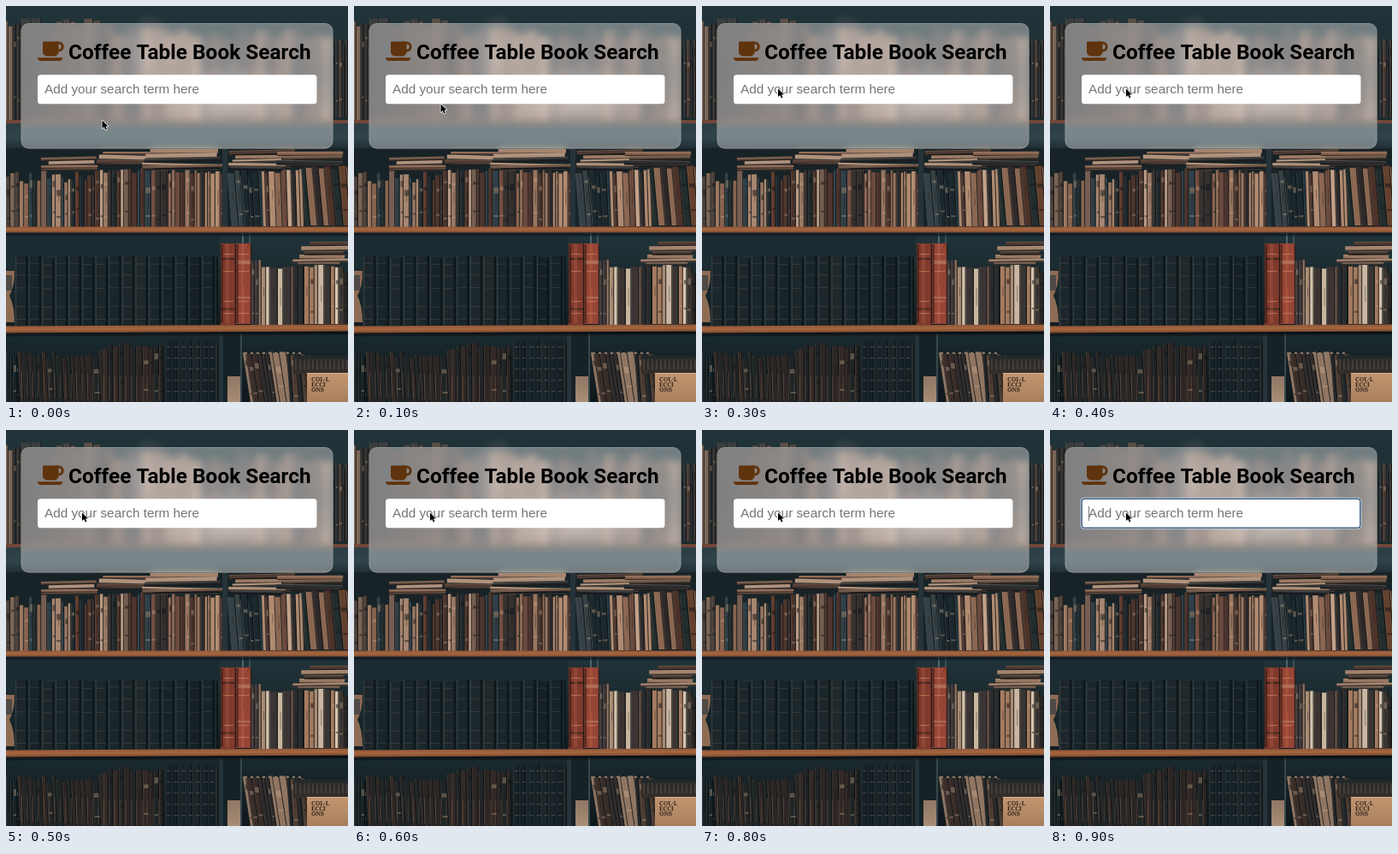
Animation, 400 px wide and 462 px high, one loop 1 s. Source, as an HTML page with a canvas:

```html
<!DOCTYPE html>
<html lang="en">
<head>
<meta charset="utf-8">
<title>Coffee Table Book Search</title>
<style>
html, body { margin: 0; width: 100%; height: 100%; overflow: hidden; background: #18262b; }
canvas { display: block; width: 400px; height: 462px; }
</style>
</head>
<body>
<canvas id="stage" width="400" height="462"></canvas>
<script>
const W = 400, H = 462, LOOP = 1000, STEP = 100;
const ctx = document.getElementById('stage').getContext('2d');

let seed = 41;
const rand = () => (seed = (seed * 16807) % 2147483647) / 2147483647;
const between = (a, b) => a + rand() * (b - a);
const pick = list => list[Math.floor(rand() * list.length)];

function layer(paint) {
  const c = document.createElement('canvas');
  c.width = W;
  c.height = H;
  paint(c.getContext('2d'));
  return c;
}

function rect(g, x, y, w, h, fill) {
  g.fillStyle = fill;
  g.fillRect(x, y, w, h);
}

function round(g, x, y, w, h, r) {
  g.beginPath();
  g.roundRect(x, y, w, h, r);
}

function fade(g, x, y, w, h, ...stops) {
  const grad = g.createLinearGradient(0, y, 0, y + h);
  stops.forEach((s, i) => grad.addColorStop(i / (stops.length - 1), s));
  rect(g, x, y, w, h, grad);
}

function glow(g, x, y, rx, ry, rgb, alpha) {
  const grad = g.createRadialGradient(0, 0, 0, 0, 0, 1);
  grad.addColorStop(0, `rgba(${rgb},${alpha})`);
  grad.addColorStop(1, `rgba(${rgb},0)`);
  g.save();
  g.translate(x, y);
  g.scale(rx, ry);
  rect(g, -1, -1, 2, 2, grad);
  g.restore();
}

const MIXED = ['#9a7864', '#6e4d40', '#1f2a2f', '#b99a83', '#4d342d', '#2f3f47', '#86634f',
  '#5f3c31', '#a88670', '#33302f', '#755e51', '#232c30'];
const WARM = ['#b08a70', '#8b6653', '#c0a189', '#6b4a3d', '#4b342d', '#2f2c2c', '#97745e'];
const PALE = ['#c9b5a0', '#a88b74', '#d6c3ad', '#7b5f50', '#3a3533', '#a37a5f', '#54443c'];
const MUTED = ['#8a7467', '#6d5b52', '#9a8374', '#5b504b', '#7c685c', '#47474a'];
const DARK = ['#172429', '#1c272b', '#152126', '#1f282a', '#19262b'];
const BROWN = ['#2a2625', '#1f2426', '#332a27', '#232526', '#2c2625'];
const SLATE = ['#26373d', '#1b282d', '#354145', '#22323a'];
const PAGES = ['#9a7863', '#6f5646', '#ad917b', '#4d3a32', '#8b6752', '#2b2d2f', '#a2836e'];
const DIM = ['#4d423c', '#26292b', '#61503f', '#1f282c', '#3a3532', '#7a6656'];

// Upright books; lean moves the feet to the right of the heads.
function books(g, x0, x1, top, bottom, colors, opt = {}) {
  const { min = 3, max = 8, jit = 10, lean = 0, bands = 0.6, gap = 0.5 } = opt;
  for (let x = x0; x < x1;) {
    const w = Math.min(between(min, max), x1 - x);
    const y = top + rand() * jit, h = bottom - y;
    g.save();
    g.transform(1, 0, lean / h, 1, x, y);
    rect(g, 0, 0, w, h, pick(colors));
    rect(g, 0, 0, 0.7, h, 'rgba(235,205,170,.12)');
    rect(g, w - 1.2, 0, 1.2, h, `rgba(8,14,17,${gap + 0.2})`);
    if (rand() < bands) {
      const by = h * between(0.1, 0.3), tone = pick(['rgba(210,175,140,.35)', 'rgba(20,20,22,.5)']);
      rect(g, 1, by, w - 2, between(2, 8), tone);
      rect(g, 1, h * between(0.65, 0.85), w - 2, 2, tone);
    }
    if (w > 4.5 && rand() < 0.5) {
      rect(g, w / 2 - 0.5, h * 0.35, 1, h * between(0.15, 0.35), 'rgba(30,24,22,.35)');
    }
    g.restore();
    x += w;
  }
}

// Books lying flat, each slightly askew.
function pile(g, x0, x1, top, bottom, colors) {
  for (let y = top; y < bottom;) {
    const h = Math.min(between(3.5, 6), bottom - y);
    const l = x0 + rand() * 16, w = x1 - rand() * 16 - l;
    g.save();
    g.transform(1, between(-0.03, 0.03), 0, 1, l, y);
    rect(g, 0, 0, w, h, pick(colors));
    rect(g, 0, 0, w, 0.8, 'rgba(240,205,175,.22)');
    rect(g, 0, h - 1.4, w, 1.4, 'rgba(12,14,16,.7)');
    g.restore();
    y += h;
  }
}

function volumes(g, x0, x1, top, bottom) {
  const w = 15.6;
  for (let x = x0; x < x1; x += w) {
    const bw = Math.min(w, x1 - x), y = top + rand() * 3;
    rect(g, x, y, bw - 1, bottom - y, pick(DARK));
    rect(g, x + 1, y, 1.2, bottom - y, 'rgba(115,125,122,.3)');
    for (const f of [0.1, 0.27, 0.45, 0.72, 0.9]) {
      rect(g, x + 2, y + (bottom - y) * f, bw - 5, 1, 'rgba(140,115,95,.25)');
    }
    rect(g, x + bw - 2.5, y, 2.5, bottom - y, '#0e181b');
  }
}

function board(g, y, h, tilt) {
  g.save();
  g.transform(1, tilt, 0, 1, 0, y);
  fade(g, 0, 0, W, h, '#94593a', '#a5663f', '#7c4a30');
  rect(g, 0, h, W, 4, 'rgba(8,16,20,.55)');
  g.restore();
}

function topRow(g) {
  fade(g, 0, 0, W, 166, '#213439', '#1a282d');
  books(g, 0, 18, 14, 133, DIM, { min: 3, max: 6 });
  books(g, 18, 126, 13, 133, ['#4d4743', '#3b3d3e', '#5c4f48', '#46413f'], { min: 6, max: 12 });
  books(g, 126, 384, 24, 133, MUTED, { min: 7, max: 15, jit: 14, bands: 0.3 });
  glow(g, 168, 62, 30, 55, '190,165,148', 0.55);
  glow(g, 265, 108, 90, 40, '215,190,170', 0.75);
  glow(g, 365, 80, 40, 60, '55,60,62', 0.6);
  books(g, 382, W, 36, 130, ['#23292c', '#b09882', '#463b37', '#2b3438'], { min: 3, max: 6 });
  rect(g, 0, 133, W, 4, '#70483a');
  fade(g, 0, 137, W, 32, '#2b3e44', '#30444a', '#1c2a30');
}

function middleRow(g) {
  rect(g, 0, 166, W, 92, '#182327');
  books(g, 0, 16, 192, 257, DIM, { min: 4, max: 6 });
  books(g, 16, 104, 192, 258, MIXED, { min: 3, max: 7, jit: 17 });
  books(g, 104, 190, 187, 258, MIXED, { min: 3, max: 8, jit: 8 });
  books(g, 190, 254, 191, 258, WARM, { min: 3, max: 7, jit: 6 });
  pile(g, 34, 108, 177, 192, PAGES);
  pile(g, 98, 190, 170, 187, PAGES);
  pile(g, 158, 258, 167, 191, PAGES);
  rect(g, 253, 166, 6, 91, '#263338');
  books(g, 259, 276, 192, 257, SLATE, { lean: 5, min: 6, max: 9 });
  books(g, 276, 300, 190, 257, SLATE, { lean: 3, min: 5, max: 8 });
  books(g, 299, 347, 190, 257, WARM, { lean: 2, min: 4, max: 8, jit: 5 });
  books(g, 345, W, 185, 256, ['#64402f', '#2f2a29', '#8b6752', '#222d2e', '#4c332a'],
    { lean: 6, min: 5, max: 9, jit: 6 });
  pile(g, 260, 340, 169, 191, PAGES);
  pile(g, 316, 398, 170, 187, PAGES);
}

function lowerRow(g) {
  fade(g, 0, 264, W, 110, '#21343a', '#131d21');
  rect(g, 0, 269, 250, 22, '#1a2c32');
  volumes(g, 10, 248, 291, 373);
  // hourglass
  g.fillStyle = '#8d6c53';
  g.beginPath();
  g.moveTo(0, 309);
  g.lineTo(10, 309);
  g.quadraticCurveTo(10, 327, 4, 338);
  g.quadraticCurveTo(10, 350, 10, 369);
  g.lineTo(0, 369);
  g.fill();
  rect(g, 0, 314, 7, 18, '#4f4a45');
  books(g, 251, 269, 277, 372, ['#7f3a2d'], { min: 18, max: 18, jit: 0, bands: 1 });
  books(g, 269, 287, 277, 371, ['#954535'], { min: 18, max: 18, jit: 0, bands: 1 });
  for (const x of [251, 269]) {
    rect(g, x, 278, 3, 92, 'rgba(30,12,10,.45)');
    rect(g, x + 6, 278, 4, 92, 'rgba(215,120,90,.22)');
    for (const y of [289, 309, 344, 358]) rect(g, x + 3, y, 12, 1.2, 'rgba(226,162,112,.45)');
  }
  rect(g, 276, 265, 2, 12, '#53666b');
  rect(g, 284, 265, 2, 12, '#3d5056');
  books(g, 287, 299, 293, 372, ['#bda58d', '#40393a', '#8d7462'], { min: 3, max: 5 });
  books(g, 299, 336, 303, 372, PALE, { min: 4, max: 10, jit: 4 });
  books(g, 336, 349, 301, 372, ['#2a2b2d', '#553d34'], { min: 5, max: 7, jit: 3 });
  books(g, 349, 396, 301, 371, PALE, { min: 4, max: 9, jit: 4 });
  books(g, 394, W, 302, 371, BROWN);
  pile(g, 330, 404, 290, 302, PAGES);
  pile(g, 342, 410, 275, 291, PAGES);
}

function bottomRow(g) {
  fade(g, 0, 382, W, 80, '#1a2a2f', '#0f181c');
  books(g, 0, 14, 402, H, DARK);
  books(g, 14, 116, 401, H, BROWN, { min: 4, max: 8, lean: 3, jit: 10, bands: 0.3 });
  books(g, 114, 184, 391, H, BROWN, { min: 5, max: 8, jit: 9, bands: 0.3 });
  for (let x = 18; x < 182; x += 6.4) {
    rect(g, x, 428 + 3 * Math.sin(x), 1, 30, 'rgba(150,116,90,.35)');
  }
  books(g, 186, 249, 390, H, DARK, { min: 7, max: 10, jit: 3, bands: 0 });
  for (let x = 188; x < 246; x += 8.5) {
    for (let y = 397; y < H; y += 13) rect(g, x, y, 5, 1.2, 'rgba(160,125,95,.35)');
  }
  rect(g, 249, 382, 5, 80, '#24343a');
  rect(g, 254, 382, 20, 80, '#172226');
  fade(g, 259, 432, 16, 30, '#8f7764', '#a88d77');
  rect(g, 274, 382, 2, 80, '#39484c');
  books(g, 277, 330, 403, H, ['#2e2b2b', '#1f2427', '#8f7562', '#382d29', '#272a2c'],
    { min: 4, max: 8, lean: 9, jit: 3, bands: 0.8 });
  books(g, 328, 352, 404, H, ['#332b28', '#222729', '#4d3d34'], { min: 4, max: 7, lean: 4, jit: 4 });
  for (let x = 279; x < 348; x += 7) rect(g, x, 404, 3, 2, '#8f7a68');
  fade(g, 336, 408, 64, 21, '#24282a', '#362f2b');
  for (let x = 338; x < W; x += 5) rect(g, x, 412, 2, 12, 'rgba(130,105,85,.3)');
  fade(g, 352, 428, 48, 34, '#c29670', '#a87e5c');
  rect(g, 352, 428, 48, 1, '#d5b08a');
  g.fillStyle = '#34271f';
  g.font = 'bold 7px "Noto Serif", serif';
  ['COL·L', 'ECCI', 'ONS'].forEach((s, i) => g.fillText(s, 357, 438 + i * 6));
}

const shelves = layer(g => {
  topRow(g);
  middleRow(g);
  lowerRow(g);
  bottomRow(g);
  board(g, 257.5, 7, 0);
  board(g, 373.5, 8, -0.005);
});

function cup(g) {
  g.fillStyle = g.strokeStyle = '#5f330d';
  round(g, 43, 41.5, 18.5, 17, [1, 0, 5, 5]);
  g.fill();
  g.lineWidth = 3;
  round(g, 57, 43, 9.2, 9, [0, 4.5, 4.5, 0]);
  g.stroke();
  g.beginPath();
  g.moveTo(37, 60.3);
  g.lineTo(66, 60.3);
  g.quadraticCurveTo(66, 64, 62, 64);
  g.lineTo(41, 64);
  g.quadraticCurveTo(37, 64, 37, 60.3);
  g.fill();
}

const page = layer(g => {
  g.drawImage(shelves, 0, 0);
  g.save();
  round(g, 17.5, 20, 365, 146.5, 9);
  g.clip();
  g.filter = 'blur(5px)';
  g.drawImage(shelves, 0, 0);
  g.filter = 'none';
  rect(g, 17, 20, 366, 147, 'rgba(255,255,255,.36)');
  g.restore();
  g.lineWidth = 1;
  g.strokeStyle = 'rgba(255,255,255,.16)';
  round(g, 18, 20.5, 364, 145.5, 9);
  g.stroke();
  cup(g);
  g.fillStyle = '#000';
  g.font = 'bold 24.4px Roboto, sans-serif';
  g.fillText('Coffee Table Book Search', 73, 62);
});

function input(focused) {
  if (focused) {
    ctx.fillStyle = 'rgba(205,220,235,.8)';
    round(ctx, 35.5, 78.8, 329, 37, 4.5);
    ctx.fill();
    ctx.fillStyle = '#2d5379';
    round(ctx, 36.5, 79.8, 327, 35, 4);
    ctx.fill();
    ctx.fillStyle = '#fff';
    round(ctx, 37.8, 81.1, 324.4, 32.4, 2.5);
  } else {
    ctx.fillStyle = '#fff';
    round(ctx, 37, 80.3, 326.5, 34, 3.5);
  }
  ctx.fill();
  ctx.fillStyle = '#757575';
  ctx.font = '15.3px "Liberation Sans", Arial, sans-serif';
  ctx.fillText('Add your search term here', 45, 102.3);
  if (focused) rect(ctx, 45, 89, 1, 17, '#777');
}

const ARROW = [[0, 0], [0, 10.6], [2.5, 8.4], [4.2, 12.2], [6, 11.4], [4.4, 7.7], [7.6, 7.5]];

function pointer(x, y) {
  ctx.save();
  ctx.translate(x, y);
  ctx.scale(0.9, 0.9);
  ctx.beginPath();
  ARROW.forEach(p => ctx.lineTo(...p));
  ctx.closePath();
  ctx.lineJoin = 'round';
  ctx.lineWidth = 1.6;
  ctx.strokeStyle = '#fff';
  ctx.stroke();
  ctx.fillStyle = '#000';
  ctx.fill();
  ctx.restore();
}

const PATH = [[112.5, 133.5], [101.5, 114.5], [93, 105], [89, 96.5]];
const start = performance.now();

function draw() {
  const step = Math.floor(((performance.now() - start) % LOOP) / STEP);
  ctx.drawImage(page, 0, 0);
  input(step >= 9);
  pointer(...PATH[Math.min(step, PATH.length - 1)]);
  requestAnimationFrame(draw);
}
draw();
</script>
</body>
</html>
```
